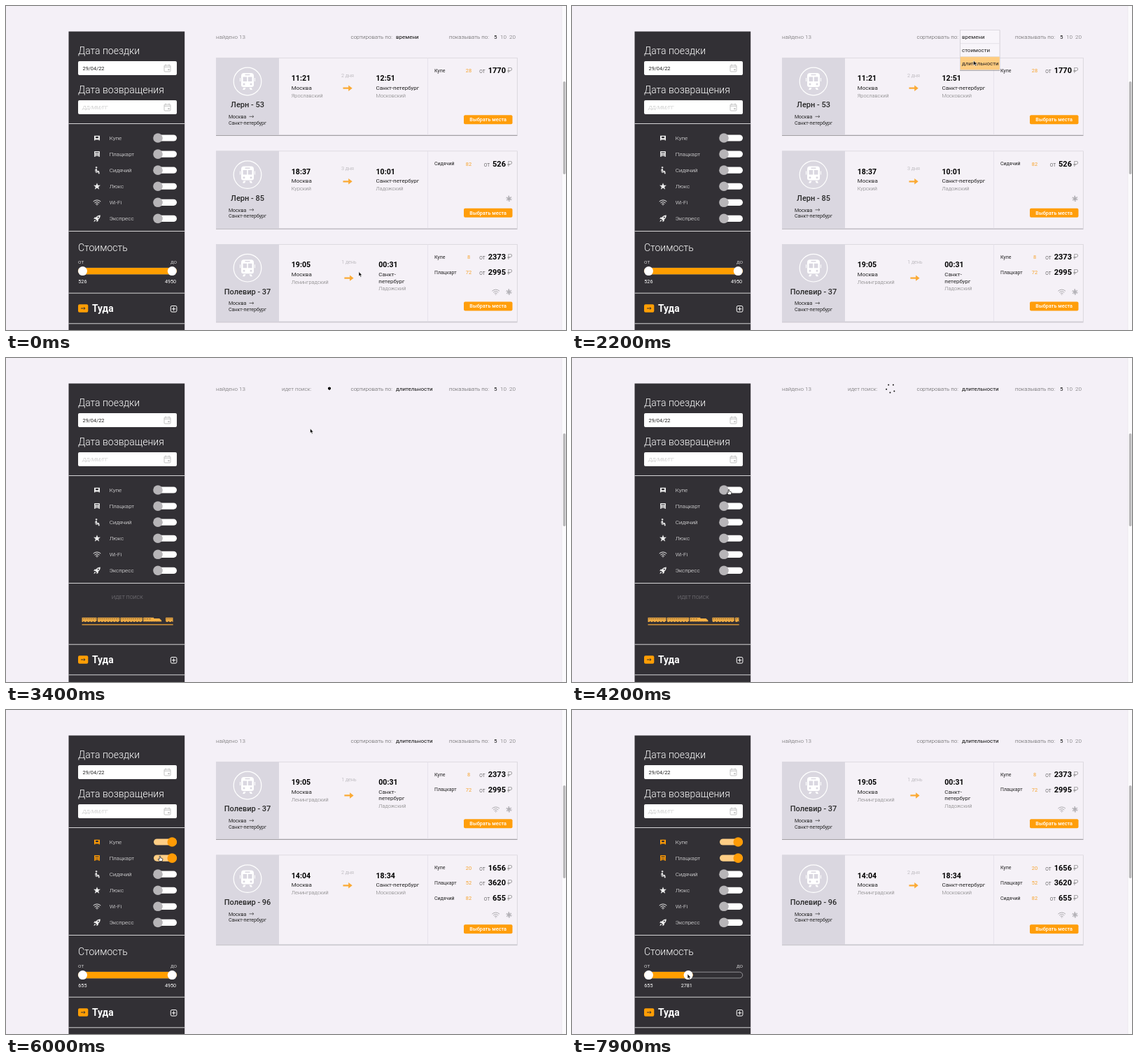
An HTML page that plays this animation: 800 by 464 pixels, repeating every 8 s.

```html
<!DOCTYPE html>
<html lang="ru">
<head>
<meta charset="utf-8">
<title>Поиск билетов</title>
<style>
  html, body { margin: 0; width: 100%; height: 100%; overflow: hidden; background: #f4f0f7; }
  svg { display: block; width: 800px; height: 464px; font-family: Roboto, "Open Sans", sans-serif; }
  text { white-space: pre; }
</style>
</head>
<body>
<svg id="stage" viewBox="0 0 800 464" xmlns="http://www.w3.org/2000/svg">
  <defs>
    <filter id="soft" x="-5%" y="-5%" width="110%" height="115%">
      <feDropShadow dx="0" dy="1" stdDeviation=".7" flood-color="#000" flood-opacity=".35"/>
    </filter>
    <clipPath id="railClip"><rect x="108.5" y="366" width="130" height="20"/></clipPath>
    <g id="wifi" fill="none" stroke="currentColor" stroke-width="1" stroke-linecap="round">
      <path d="M-5-1.5A7.2 7.2 0 0 1 5-1.5M-3.3.5A4.8 4.8 0 0 1 3.3.5M-1.6 2.3A2.4 2.4 0 0 1 1.6 2.3"/>
      <circle cy="3.8" r=".6" fill="currentColor" stroke="none"/>
    </g>
    <g id="snow" fill="none" stroke="currentColor" stroke-width=".8">
      <path d="M0-4.2V4.2M-3.6-2.1L3.6 2.1M-3.6 2.1L3.6-2.1"/>
      <circle r="2"/><circle r="3.6" stroke-dasharray="1.6 2.17"/>
    </g>
    <g id="tram">
      <circle r="19.8" fill="none" stroke="#fff" stroke-width="1.2"/>
      <path fill="#fff" fill-rule="evenodd" d="M-5-12H5Q9-12 9-8V5Q9 8 6 8H-6Q-9 8-9 5V-8Q-9-12-5-12ZM-3.5-10.2V-8.7H3.5V-10.2ZM-6.5-6.5V0H-.8V-6.5ZM.8-6.5V0H6.5V-6.5ZM-5 2.6a1.5 1.5 0 1 0 .01 0ZM5 2.6a1.5 1.5 0 1 0 .01 0Z"/>
      <path fill="#fff" d="M-10-5h-1v5h1zM10-5h1v5h-1zM-5.5 9h3l-1.5 3h-3zM5.5 9h-3l1.5 3h3z"/>
    </g>
    <g id="calendar" fill="none" stroke="#c4c4c4" stroke-width="1">
      <rect x="-4.5" y="-4" width="9" height="9" rx="1"/>
      <path d="M-4.5-1.7H4.5M-2.5-5.6V-3M2.5-5.6V-3"/>
      <rect x=".8" y="1" width="2.2" height="2.2" fill="#c4c4c4" stroke="none"/>
    </g>
    <g id="icon0"><path fill="currentColor" d="M-4-3.2H4V3.4H2.6V2.4H-2.6V3.4H-4ZM-2-2V.2H2V-2Z" fill-rule="evenodd"/></g>
    <g id="icon1"><path fill="currentColor" fill-rule="evenodd" d="M-3.8-4H3.8V4H2.4V2.6H-2.4V4H-3.8ZM-2-3V-.8H-.6V-3ZM.6-3V-.8H2V-3ZM-2.4.6V1.4H2.4V.6Z"/></g>
    <g id="icon2" fill="none" stroke="currentColor" stroke-width="1.7" stroke-linecap="round" stroke-linejoin="round">
      <circle cx="-1" cy="-4" r=".9" fill="currentColor" stroke-width=".6"/><path d="M-1-1.6L-.6 1.6H2.2L2.8 4.4"/><path d="M-2.5-.8L-1.7 3.2H.6" stroke-width=".8"/>
    </g>
    <path id="icon3" fill="currentColor" d="M0-5L1.3-1.5L5-1.4L2.1.8L3.1 4.4L0 2.3L-3.1 4.4L-2.1.8L-5-1.4L-1.3-1.5Z"/>
    <use id="icon4" href="#wifi"/>
    <path id="icon5" fill="currentColor" fill-rule="evenodd" d="M4.8-4.8Q.8-4.8-1.2-2L-3.6-1.6L-4.8.6L-2.6.4L-.4 2.6L-.6 4.8L1.6 3.6L2 1.2Q4.8-.8 4.8-4.8ZM1.8-2.8a1 1 0 1 1-.01 0ZM-3.2 1.6L-4.8 4.8L-1.6 3.2Z"/>
    <path id="arrow" fill="#fbaa35" d="M-6.5-1.1H1.2V-4.2L6.7 0L1.2 4.2V1.1H-6.5Z"/>
  </defs>
  <rect width="800" height="464" fill="#f4f0f7"/>
  <rect x="794" width="6" height="464" fill="#fbfafc"/>
  <path d="M794 0V464" stroke="#e7e4e9" stroke-width=".6"/>
  <rect x="795.8" y="108" width="3.6" height="133" rx="1.8" fill="#b9b8ba"/>
  <g id="cards"></g>
  <g id="head"></g>
  <g id="panel"></g>
  <g id="lower"></g>
  <g id="moving"></g>
  <g id="pointer" stroke-linejoin="round"></g>
</svg>
<script>
const LOOP = 8000;
const SEARCH_ON = 2500, SEARCH_OFF = 4400, MENU_ON = 1400;
const CLICKS = [5000, 5700];
const DRAG_ON = 7100, DRAG_OFF = 7850;
const ORANGE = '#ff9b05';
const $ = id => document.getElementById(id);

const clamp = v => Math.max(0, Math.min(1, v));
const smooth = v => { v = clamp(v); return v * v * (3 - 2 * v); };
const mix = (a, b, k) => a + (b - a) * k;

// Text placed by the vertical centre of its capitals.
const label = (x, y, size, str, fill = '#222', weight = 400, anchor = 'start', extra = '') =>
  `<text x="${x}" y="${y + size * .355}" font-size="${size}" fill="${fill}" font-weight="${weight}" text-anchor="${anchor}" ${extra}>${str}</text>`;
const box = (x, y, w, h, fill, extra = '') =>
  `<rect x="${x}" y="${y}" width="${w}" height="${h}" fill="${fill}" ${extra}/>`;
const use = (id, x, y, color = '#fff') =>
  `<use href="#${id}" transform="translate(${x} ${y})" color="${color}"/>`;
const line = (d, color, width = 1) =>
  `<path d="${d}" fill="none" stroke="${color}" stroke-width="${width}"/>`;

const trip = (name, out, from, span, back, to, x2, wrap, seats, icons = '') =>
  ({ name, out, from, span, back, to, x2, wrap, seats, icons });
const TRIPS = {
  l53: trip('Лерн - 53', '11:21', 'Ярославский', '2 дня', '12:51', 'Московский', 528.5, false, [['Купе', 28, 1770]]),
  l85: trip('Лерн - 85', '18:37', 'Курский', '3 дня', '10:01', 'Ладожский', 528.5, false, [['Сидячий', 82, 526]], 's'),
  p37: trip('Полевир - 37', '19:05', 'Ленинградский', '1 день', '00:31', 'Ладожский', 532.3, true,
    [['Купе', 8, 2373], ['Плацкарт', 72, 2995]], 'ws'),
  z92: trip('Зорвит - 92', '14:37', 'Курский', '7 : 56', '22:33', 'Ладожский', 527.5, false,
    [['Люкс', 2, 3165], ['Купе', 86, 1521]], 'ws'),
  l24: trip('Лерн - 24', '04:14', 'Курский', '22 : 21', '02:35', 'Ладожский', 531.8, true, []),
  p96: trip('Полевир - 96', '14:04', 'Ленинградский', '2 дня', '18:34', 'Московский', 528.5, false,
    [['Купе', 20, 1656], ['Плацкарт', 52, 3620], ['Сидячий', 82, 655]], 'ws'),
};

function listAt(t) {
  if (t < SEARCH_ON) return ['l53', 'l85', 'p37'];
  if (t < SEARCH_OFF) return [];
  if (t < CLICKS[0]) return ['z92', 'l24', 'p37'];
  if (t < CLICKS[1]) return ['z92', 'p37', 'l53'];
  return ['p37', 'p96'];
}

function card(c, y) {
  const h = c.seats.length > 2 ? 128.5 : 111;
  const mid = 488 + (c.x2 - 528.5) / 2;
  const drop = c.wrap ? 9.5 : 0;
  const city = c.wrap ? ['Санкт-', 'петербург'] : ['Санкт-петербург'];
  let s = box(300, 0, 430.5, h, '#f5f1f7', 'filter="url(#soft)"');
  s += box(300.25, .25, 430, h - .5, '#f5f1f7', 'stroke="#cfccd3" stroke-width=".6"');
  s += box(300, 0, 90, h, '#dad7e0');
  s += line(`M602.5 0V${h}`, '#e4e0e7', .8);
  s += use('tram', 345, 34);
  s += label(345, 67.5, 11, c.name, '#292929', 500, 'middle');
  s += label(318, 84.8, 7, 'Москва') + line('M347.5 84.3H353.8M352 82.6L353.8 84.3L352 86', '#333', .7);
  s += label(318, 93.3, 7, 'Санкт-петербург');
  s += label(407.8, 29.5, 10.6, c.out, '#000', 700) + label(c.x2, 29.5, 10.6, c.back, '#000', 700);
  s += label(407.8, 43, 8, 'Москва') + label(407.8, 54, 7.4, c.from, '#777', 300);
  city.forEach((part, i) => s += label(c.x2, 43 + i * 9.5, 8, part));
  s += label(c.x2, 54 + drop, 7.4, c.to, '#777', 300);
  s += label(mid, 25, 7.2, c.span, '#aaa8ad', 300, 'middle');
  s += use('arrow', mid, 43.7 + drop / 2);
  c.seats.forEach(([kind, count, price], i) => {
    const cy = 18.3 + i * 21.6;
    s += label(612, cy, 7, kind) + label(661, cy, 7.4, count, '#f7a42f', 400, 'middle');
    s += label(714, cy, 11, `<tspan font-size="8.2" font-weight="300" fill="#444">от</tspan><tspan dx="4">${price}</tspan>`, '#000', 700, 'end');
    s += label(716.3, cy, 11, '₽', '#777', 300);
  });
  if (c.icons.includes('w')) s += use('wifi', 699.7, h - 42.7, '#aaa8ac');
  if (c.icons.includes('s')) s += use('snow', 718.5, h - 42.7, '#a3a1a6');
  s += box(654, h - 28.8, 69.5, 13, '#ff9e0b', 'rx="2"');
  s += label(688.7, h - 22.3, 7.3, 'Выбрать места', '#fff', 500, 'middle');
  return `<g transform="translate(0 ${y})">${s}</g>`;
}

function header(searching, sort) {
  let s = label(300, 44, 8, 'найдено 13', '#666', 300);
  if (searching) s += label(394, 44, 8, 'идет поиск:', '#666', 300);
  s += label(492.5, 44, 8, 'сортировать по:', '#555', 300) + label(557, 44, 8, sort, '#111');
  s += label(633, 44, 8, 'показывать по:', '#555', 300);
  return s + label(697, 44, 8, '5', '#111') + label(706, 44, 8, '10', '#666', 300) + label(719, 44, 8, '20', '#666', 300);
}

function menu(active) {
  let s = box(554.5, 34.5, 56.5, 57, '#f8f5fa', 'filter="url(#soft)" stroke="#cfccd2" stroke-width=".6"');
  ['времени', 'стоимости', 'длительности'].forEach((item, i) => {
    const y = 34.8 + i * 18.9;
    if (i === active) s += box(554.8, y, 56, 18.6, '#ffcc80');
    if (i) s += line(`M555 ${y}H610.5`, '#d9d6dc', .6);
    s += label(557, y + 9.2, 8, item, '#222');
  });
  return s;
}

const OPTIONS = ['Купе', 'Плацкарт', 'Сидячий', 'Люкс', 'Wi-Fi', 'Экспресс'];

function panel(states) {
  let s = box(89.5, 36.5, 165.7, 428, '#323035');
  s += label(103, 64, 14, 'Дата поездки', '#fff', 300) + label(103, 120, 14, 'Дата возвращения', '#fff', 300);
  [89, 145].forEach(y => s += box(103, y - 10, 141, 20, '#fff', 'rx="2"') + use('calendar', 230.5, y));
  s += label(109.5, 89, 7.4, '29/04/22', '#222') + label(109, 145, 7.4, 'ДД/ММ/ГГ', '#b5b5b5', 300, 'start', 'font-style="italic"');
  s += line('M89.5 168.5H255.2M89.5 322.5H255.2', '#d5d4d6');
  OPTIONS.forEach((name, i) => {
    const y = 189 + i * 23.08, on = states[i] || 0;
    s += use('icon' + i, 130, y, on > .5 ? ORANGE : '#eee') + label(147.7, y, 8, name, '#fff', 300);
    s += box(211, y - 4.6, 33, 9.2, on > .5 ? '#ffce85' : '#fff', 'rx="4.6"');
    s += `<circle cx="${mix(217, 237.3, on)}" cy="${y}" r="6.8" fill="${on > .5 ? ORANGE : '#b7b5b8'}"/>`;
  });
  return s;
}

function lower(searching, low, right) {
  const dy = searching ? -1 : 0;
  let s = '';
  if (searching) {
    s += label(173.5, 342.5, 7.2, 'ИДЕТ ПОИСК', '#858388', 300, 'middle');
    s += line('M108.5 381.8H238.7', '#f5a93a', 1.2);
  } else {
    const high = Math.round(low + (right - 103) / 141 * (4950 - low));
    s += label(103, 346.5, 14, 'Стоимость', '#fff', 300);
    s += label(103, 366, 8, 'от', '#fff', 300) + label(244, 366, 8, 'до', '#fff', 300, 'end');
    s += box(103.3, 375.3, 140.4, 8.6, 'none', 'rx="4.3" stroke="#a9a8ab" stroke-width=".8"');
    s += box(103, 375, right - 103, 9.2, '#ff9e00', 'rx="4.6"');
    [109.5, right - 6.7].forEach(x => s += `<circle cx="${x}" cy="379.6" r="6.5" fill="#fff"/>`);
    s += label(103.3, 394.7, 7.2, low, '#fff') + label(right - 9, 394.7, 7.2, high, '#fff', 400, 'middle');
  }
  s += `<g transform="translate(0 ${dy})">` + line('M89.5 411.2H255.2M89.5 454.8H255.2', '#d5d4d6');
  s += box(103, 427.3, 14.3, 11.5, '#ff9e05', 'rx="2"') + line('M107 433H113M111.3 431.4L113 433L111.3 434.6', '#323035', 1);
  s += label(123, 433, 13.8, 'Туда', '#fff', 700);
  s += box(235.3, 429.5, 8.6, 8.6, 'none', 'rx="1.8" stroke="#fff" stroke-width="1"');
  return s + line('M239.6 431.2V436.4M237 433.8H242.2', '#fff') + '</g>';
}

// One carriage set: three wagons and an engine heading right.
function trainSet(x) {
  let s = '';
  for (let i = 0; i < 3; i++) {
    const cx = x + i * 32.7;
    s += box(cx, 371.8, 31.4, 5, '#f7b044') + line(`M${cx + 1} 373.6H${cx + 30.5}`, '#5d4a33', .9).replace('/>', ' stroke-dasharray="1.8 1"/>');
    s += line(`M${cx + .5} 377.3H${cx + 31}`, '#f7b044', 1.2).replace('/>', ' stroke-dasharray="3 1.4"/>');
  }
  const e = x + 98;
  s += `<path d="M${e} 371.8H${e + 15}V373H${e + 23}L${e + 26} 375.8V377.4H${e}Z" fill="#f7b044"/>`;
  return s + line(`M${e + 1} 373.7H${e + 12}M${e + 2} 377.8H${e + 25}`, '#5d4a33', .8).replace('/>', ' stroke-dasharray="2.4 1.2"/>');
}

function loaders(t) {
  const shift = ((t - SEARCH_ON) * .1278 + 4.5) % 130;
  let s = `<g clip-path="url(#railClip)">${trainSet(108.5 + shift)}${trainSet(108.5 + shift - 130)}</g>`;
  const p = ((t - SEARCH_ON) / 1640 + .41) % 1;
  const turns = [0, 1, 2, 3, 4].map(i => smooth((p - i * .08) / .6));
  const r = mix(1.8, 1, clamp((turns[0] - turns[4]) * 3.6));
  for (const k of turns) {
    const a = k * Math.PI * 2;
    s += `<circle cx="${455.5 + 6.5 * Math.cos(a)}" cy="${43.6 + 6 * Math.sin(a)}" r="${r}" fill="#111"/>`;
  }
  return s;
}

// time, x, y of the pointer tip
const PATH = [
  [0, 504, 380.5], [750, 583, 23], [900, 585.5, 32], [1200, 577.8, 48], [1600, 577.8, 48],
  [2300, 573.5, 80], [2700, 573.5, 80], [3400, 434.5, 101], [4250, 222, 189], [4500, 219.5, 194],
  [5300, 219.5, 194], [5600, 220, 209], [6150, 220, 209], [7000, 236, 377.5],
  [DRAG_ON, 236, 377.5], [DRAG_OFF, 165, 378], [LOOP, 165, 378],
];
const ARROW = '<path d="M0 0V6.6L1.5 5.3L2.5 7.7L3.7 7.2L2.7 4.9H4.7Z" fill="#000" stroke="#fff" stroke-width=".6"/>';
const HAND = '<path d="M-.8 .6Q0-.6 .7 .6V2.9L3.4 3.6Q4 3.9 3.8 5L3.2 7.6H-.6L-2.8 4.8Q-2.4 3.8-.8 4.8Z" fill="#fff" stroke="#111" stroke-width=".7"/>';

function pointerAt(t) {
  const i = Math.max(1, PATH.findIndex(k => k[0] >= t));
  const [t0, x0, y0] = PATH[i - 1], [t1, x1, y1] = PATH[i];
  const k = smooth((t - t0) / (t1 - t0));
  return [mix(x0, x1, k), mix(y0, y1, k)];
}

const drawn = {};
function put(id, key, make) {
  if (drawn[id] === key) return;
  drawn[id] = key;
  $(id).innerHTML = make();
}

function render(t) {
  const searching = t >= SEARCH_ON && t < SEARCH_OFF;
  const open = t >= MENU_ON && t < SEARCH_ON;
  const [x, y] = pointerAt(t);
  const list = listAt(t);
  const sort = t < SEARCH_ON ? 'времени' : 'длительности';
  const active = y < 53 ? 0 : y < 72 ? 1 : 2;
  const states = CLICKS.map(c => smooth((t - c) / 160));
  const right = mix(244, 172.8, smooth((t - DRAG_ON) / (DRAG_OFF - DRAG_ON)));
  const low = t < SEARCH_ON ? 526 : 655;
  const hand = t > 4200 && t < 6300;

  put('cards', list.join(), () => list.map((id, i) => card(TRIPS[id], 74 + i * 133.6)).join(''));
  put('head', [searching, sort, open && active].join(), () => header(searching, sort) + (open ? menu(active) : ''));
  put('panel', states.join(), () => panel(states));
  put('lower', [searching, low, right].join(), () => lower(searching, low, right));
  put('moving', searching ? t : 'none', () => searching ? loaders(t) : '');
  put('pointer', hand, () => hand ? HAND : ARROW);
  $('pointer').setAttribute('transform', `translate(${x} ${y})`);
}

const start = performance.now();
function tick(now) {
  render(Math.max(0, now - start) % LOOP);
  requestAnimationFrame(tick);
}
render(0);
requestAnimationFrame(tick);
</script>
</body>
</html>
```
